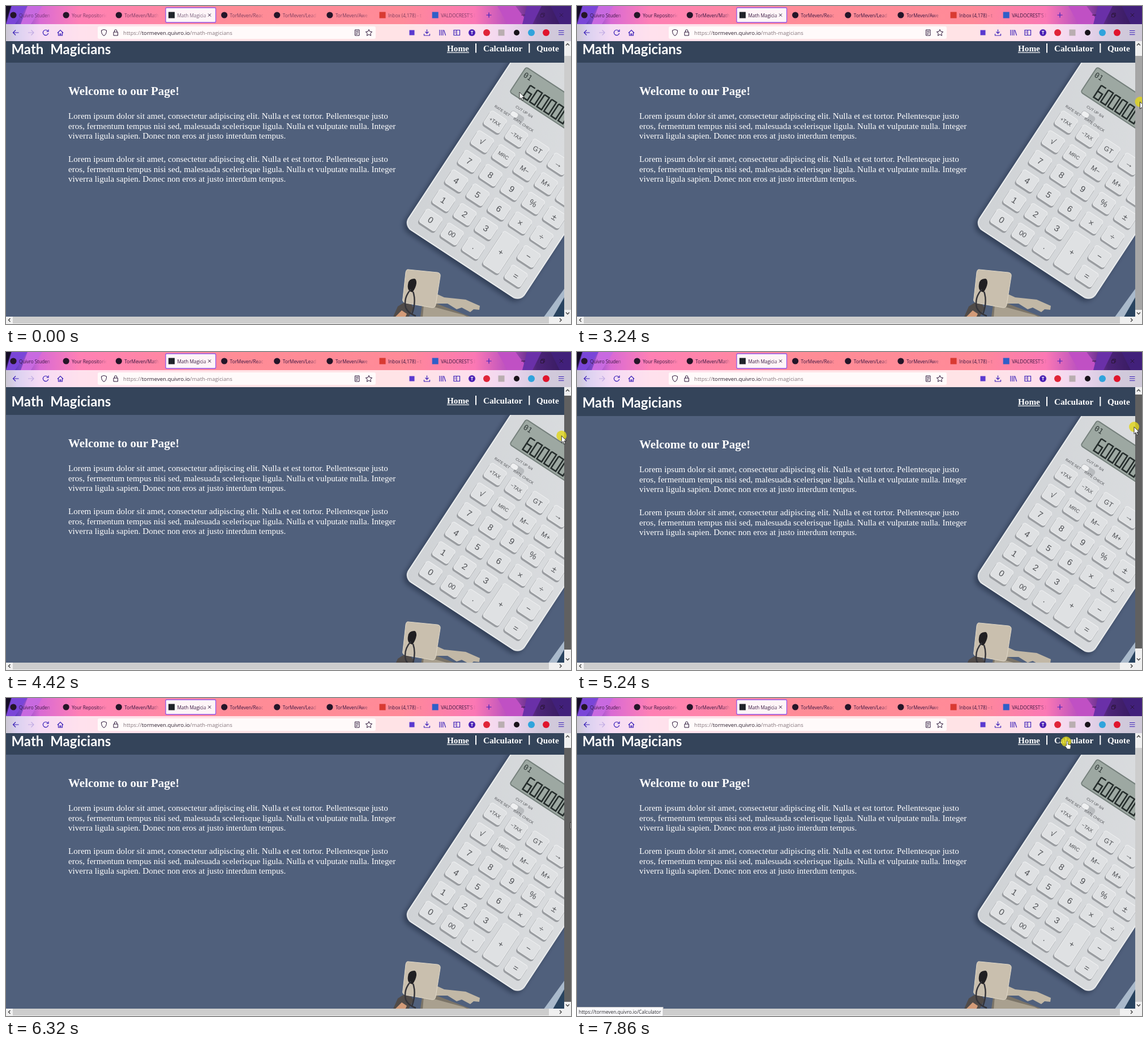
Write an HTML page that moves like this. It is 998 by 561 pixels and loops after 7.99 s.

```html
<!DOCTYPE html>
<html lang="en">
<head>
<meta charset="utf-8">
<title>Math Magicians</title>
<style>
  html, body { margin: 0; width: 100%; height: 100%; overflow: hidden; background: #f0f0f0; }
  svg { display: block; width: 998px; height: 561px; }
  .ui { font-family: "Open Sans", "Noto Sans", sans-serif; }
  .serif { font-family: "Liberation Serif", "Times New Roman", serif; fill: #fff; }
  .line { fill: none; stroke: #3b22b8; stroke-width: 1.2; }
  .dark { stroke: #2a1538; stroke-width: 1; }
  .key { font-family: "Liberation Sans", Arial, sans-serif; fill: #4c4e52; text-anchor: middle; }
</style>
</head>
<body>
<svg id="stage" viewBox="0 0 998 561" xmlns="http://www.w3.org/2000/svg"></svg>
<script>
const LOOP = 7990;
const stage = document.getElementById('stage');
const $ = id => document.getElementById(id);
const rect = (x, y, w, h, fill, extra = '') =>
  `<rect x="${x}" y="${y}" width="${w}" height="${h}" fill="${fill}" ${extra}/>`;
const dot = (x, y, r, fill) => `<circle cx="${x}" cy="${y}" r="${r}" fill="${fill}"/>`;
const poly = (pts, fill) => `<polygon points="${pts}" fill="${fill}"/>`;
const line = (d, cls = 'line') => `<path class="${cls}" d="${d}"/>`;
const text = (x, y, size, str, extra = '') =>
  `<text x="${x}" y="${y}" font-size="${size}" ${extra}>${str}</text>`;

const defs = `<defs>
  <linearGradient id="theme">
    <stop offset="0" stop-color="#2a1848"/><stop offset=".02" stop-color="#6a40c4"/>
    <stop offset=".06" stop-color="#d96ad4"/><stop offset=".13" stop-color="#ff80b4"/>
    <stop offset=".4" stop-color="#ff8c96"/><stop offset=".7" stop-color="#ff8a98"/>
    <stop offset=".83" stop-color="#fb78b4"/><stop offset=".89" stop-color="#b850c0"/>
    <stop offset=".94" stop-color="#4c2478"/><stop offset="1" stop-color="#301858"/>
  </linearGradient>
  <linearGradient id="fade" gradientUnits="userSpaceOnUse" x1="46" x2="62" y1="0" y2="0">
    <stop offset="0" stop-color="#35143f"/><stop offset="1" stop-color="#35143f" stop-opacity="0"/>
  </linearGradient>
  <linearGradient id="body" x1="0" y1="1" x2="1" y2="0">
    <stop offset="0" stop-color="#cfd2d5"/><stop offset="1" stop-color="#dfe1e3"/>
  </linearGradient>
  <clipPath id="view"><rect y="62" width="986" height="486"/></clipPath>
</defs>`;

// Browser frame
const tabs = [
  ['Quivro Studen', 'dot'], ['Your Repositorie', 'dot'], ['TorMeven/Math', 'dot'],
  ['Math Magicia', '#20232a'], ['TorMeven/Reac', 'dot'], ['TorMeven/Lead', 'dot'],
  ['TorMeven/Awe', 'dot'], ['Inbox (4,178) - t', '#d93a32'], ["VALDOCREST'S I", '#2f5fc8']
];
function tabBar() {
  let icons = '', names = '';
  tabs.forEach(([name, icon], i) => {
    const x = 13 + i * 93.15;
    icons += icon === 'dot' ? dot(x, 16, 5.6, '#241528') : rect(x - 5.5, 10.5, 11, 11, icon);
    names += `<g transform="translate(${x + 10} 0)">${text(0, 19.5, 8.2, name, 'fill="url(#fade)"')}</g>`;
  });
  return rect(0, 0, 998, 62, 'url(#theme)')
    + poly('0,0 9,0 0,26', '#140c26') + poly('10,0 38,0 16,32 0,32', '#7a46d8')
    + poly('38,0 64,0 44,32 26,32', '#c86ae0')
    + poly('868,0 900,0 924,32 886,32', '#c050c4') + poly('920,0 946,0 930,32 912,32', '#6a30a8')
    + poly('962,0 998,0 998,32 978,32', '#41207a')
    + rect(0, 32, 998, 30, '#fff', 'opacity=".76"')
    + rect(282, 3, 88.5, 26, '#fff5f8', 'rx="2" stroke="#9255e8" stroke-width="1.3"')
    + icons + `<g id="live">${names}`
    + line('M910 16h7M944.5 14.5h5v5h-5zM946 14.5v-1.8h5.2v5.2h-1.7M977.8 12.8l6.4 6.4m0-6.4l-6.4 6.4', 'line dark')
    + '</g>' + line('M357 13.5l5 5m0-5l-5 5', 'line dark') + line('M848.5 16h9M853 11.5v9');
}
function toolbar() {
  return rect(162, 36, 491, 22, '#fffafa', 'rx="3"')
    + line('M22.5 47h-10m4.5-4.5l-4.5 4.5l4.5 4.5')
    + `<g opacity=".25">${line('M39 47h10m-4.5-4.5l4.5 4.5l-4.5 4.5')}</g>`
    + line('M74 44.3a4.7 4.7 0 1 0 .7 3.7M75 41.5v3.5h-3.5')
    + line('M91 47.5l5-5l5 5M92.5 46.5v5.5h7v-5.5M95 52v-3h2v3')
    + line('M173 41.5l4.5 1.5q.3 7-4.5 9.5q-4.8-2.5-4.5-9.5z', 'line dark')
    + line('M190 46h7.5v6h-7.5zM191.5 46v-2a2.2 2.2 0 0 1 4.4 0v2', 'line dark')
    + text(207, 51, 9.6, 'https://<tspan fill="#2d2030">tormeven.quivro.io</tspan>/math-magicians', 'fill="#85757c"')
    + line('M616.5 42h7.5v10h-7.5zM618 44.5h4.5M618 47h4.5M618 49.5h3', 'line dark')
    + line('M641 41.5l1.7 3.6 4 .5-2.9 2.7.7 4-3.5-2-3.5 2 .7-4-2.9-2.7 4-.5z', 'line dark')
    + rect(712.5, 42.5, 9, 9, '#5a3ad0')
    + line('M743.5 41.5v7m-3-3l3 3l3-3M738.5 49v3h10v-3')
    + line('M766 42v10M769 42v10M771.8 42v10M773.5 42.5l3 9.5')
    + line('M791 42.5h10.5v9h-10.5zM796 42.5v9M792.5 45h2M792.5 47.5h2')
    + dot(823, 47, 6, '#4b22b4') + text(823, 50, 8, 'T', 'fill="#fff" text-anchor="middle" font-weight="700"')
    + dot(849, 47, 6, '#e02438') + rect(869.5, 41.5, 11, 11, '#b9aeb0')
    + dot(902, 47, 5, '#17121a') + dot(928, 47, 6, '#2fa4dc') + dot(954, 47, 6, '#e0142c')
    + line('M976 43.5h9.5M976 47h9.5M976 50.5h9.5');
}

// Calculator, in its own tilted axes: x along the rows, y up the columns
const keyRows = [
  ['0', '00', '·', '', '='], ['1', '2', '3', '', '−'], ['4', '5', '6', '×', '÷'],
  ['7', '8', '9', '%', '±'], ['√', 'MRC', 'M−', 'M+', 'C'], ['+TAX', '−TAX', 'GT', '→', '']
];
function button(x, y, label, h = 28) {
  const size = label.length > 2 ? 9 : label.length > 1 ? 12 : 15;
  return rect(x - 17, y - h / 2 + 2, 35, h + 2, '#9a9da1', 'rx="5"')
    + rect(x - 16, y - h / 2, 33, h, '#dfe1e3', 'rx="4" stroke="#f0f1f2"')
    + text(x, y + size * .36, size, label, 'class="key"');
}
function digit(x, six) {
  return `<path d="M${x} -329h10${six ? 'M' + x + ' -317h10v13h-10v-25' : 'v25h-10v-25'}" fill="none" stroke="#252d2c" stroke-width="2.6"/>`;
}
function calculator() {
  let s = rect(0, -440, 245, 440, 'url(#body)', 'rx="15" stroke="#eceeef" stroke-width="2" style="filter:drop-shadow(-2px 6px 4px #1b263c99)"')
    + rect(27, -352, 214, 53, '#9da8a2', 'rx="4" stroke="#75807c" stroke-width="2"')
    + text(31, -335, 13, '01', 'fill="#303938" font-family="DejaVu Sans Mono, monospace"');
  for (let i = 0; i < 7; i++) s += digit(51 + i * 15, i === 0);
  keyRows.forEach((row, r) => row.forEach((label, c) => {
    if (label) s += button(34 + c * 45, -34 - r * 41.4, label);
  }));
  return `<g transform="translate(703 387) rotate(33.3)">${s}
    ${button(169, -54.5, '+', 70)}${button(200, -276, '')}
    ${rect(48, -276, 27, 11, '#b8bbbe', 'rx="5"')}${rect(49, -275, 13, 9, '#eff0f1', 'rx="4"')}
    ${text(50, -282, 6.5, 'CUT UP 5/4', 'class="key" style="text-anchor:start"')}
    ${text(34, -262, 6.5, 'RATE SET', 'class="key"')}${text(79, -262, 6.5, 'RATE CHECK', 'class="key"')}
  </g>`;
}
function keyRing() {
  return poly('684,548 692,530 711,518 720,533 704,561 684,561', '#504b49')
    + poly('688,548 699,537 708,543 700,561 684,561', '#d39b78')
    + poly('735,528 758,524 820,548 838,561 730,561', '#7b7468')
    + poly('748,505 761,508 774,514 812,518 837,529 836,536 826,535 820,540 805,532 796,535 780,525 756,525', '#c2b8a6')
    + poly('738,526 760,532 808,545 822,552 814,561 735,561', '#a9a08f')
    + '<path d="M711 465l51 5q6 1 5 7l-8 50q-1 6-7 5l-46-8q-7-2-5-8l5-46q1-6 5-5z" fill="#c9bfae" stroke="#e0d8c8"/>'
    + '<path d="M721 481q-10 0-11 10q-2 12 8 14q6-8 7-16q0-8-4-8z" fill="#201f22"/>'
    + '<path d="M715 500q-13 14-9 32q4 10 18 15M719 504q6 17-2 40" fill="none" stroke="#34343a" stroke-width="2.5"/>'
    + poly('986,499 941,561 986,561', '#a9b9cb') + poly('986,514 959,561 986,561', '#28435f');
}

const lorem = ['Lorem ipsum dolor sit amet, consectetur adipiscing elit. Nulla et est tortor. Pellentesque justo',
  'eros, fermentum tempus nisi sed, malesuada scelerisque ligula. Nulla et vulputate nulla. Integer',
  'viverra ligula sapien. Donec non eros at justo interdum tempus.'];
const paragraph = y => lorem.map((l, i) => text(110, y + i * 17.53, 15.17, l)).join('');

// Page coordinates are those of the page scrolled to its end
function page() {
  return `<g clip-path="url(#view)"><g id="page">
    ${rect(0, 49, 986, 520, '#50607c')}${keyRing()}${calculator()}
    ${rect(0, 49, 986, 51, '#34445a')}
    ${text(9.5, 84.5, 24, 'Math Magicians', 'fill="#fff" font-weight="700" style="font-family:\'Comic Sans MS\',Lato,sans-serif;word-spacing:6px"')}
    <g class="serif">
      <g font-weight="700">
        ${text(779, 80, 15.2, 'Home')}${text(843, 80, 15.2, 'Calculator')}${text(937, 80, 15.2, 'Quote')}
        ${text(110, 156.5, 21, 'Welcome to our Page!')}
      </g>
      ${rect(779, 81.5, 39, 1.2, '#fff')}${rect(829, 66, 2, 16.5, '#fff')}${rect(923.3, 66, 2, 16.5, '#fff')}
      ${paragraph(199)}${paragraph(275)}
    </g>
  </g></g>`;
}
function scrollBars() {
  const arrows = 'M989 69.5l3-3l3 3M989 540.5l3 3l3-3M7.5 551l-3 3l3 3M978 551l3 3l-3 3';
  return rect(986, 62, 12, 499, '#f0f0f0') + rect(0, 548, 998, 13, '#f0f0f0')
    + rect(12, 548, 947, 12, '#cdcdcd')
    + '<rect id="thumb" x="986" y="88" width="12" height="448"/>'
    + `<path d="${arrows}" fill="none" stroke="#505050" stroke-width="1.6"/>`;
}

stage.innerHTML = defs + `<g class="ui">${tabBar()}${toolbar()}</g>` + page() + scrollBars()
  + `<g id="status" class="ui">${rect(-1, 545.5, 153, 16, '#f9f9fb', 'stroke="#c4c4c8"')}
     ${text(3, 556.5, 8.4, 'https://tormeven.quivro.io/Calculator', 'fill="#2a2a2e"')}</g>
  <g id="cursor"><circle id="press" r="9" fill="#e0d51c" fill-opacity=".82"/>
    <path id="arrow" d="M0 0V12.5L2.9 9.9L5 14.6L7 13.7L5 9.1H8.8Z" fill="#fff" stroke="#111" stroke-width=".8"/>
    <path id="hand" d="M.6 7V.2a1.3 1.3 0 0 1 2.6 0V5l4.2.9q1 .3.9 1.4L7.6 13H2L-1.6 8.2q-.6-1.6.8-1.5z" fill="#fff" stroke="#222" stroke-width=".7"/>
  </g>`;

// [time, x, y]
const path = [
  [0, 907, 152], [1389, 907, 152], [1390, 907, 150.5], [1900, 907, 150.5], [2080, 899, 170],
  [2280, 922, 187], [2480, 958, 184], [2680, 984, 178], [2950, 996, 172], [3170, 996, 170],
  [3240, 994.5, 169], [3600, 996, 177], [3990, 992, 170], [4280, 980, 161], [4620, 983, 129],
  [5030, 983, 129], [5240, 984, 132], [5500, 990, 158], [5780, 997, 188], [6180, 997, 219],
  [6520, 997, 219], [6800, 950, 150], [7060, 872, 84], [7260, 864, 77], [LOOP, 864, 77]
];
const thumbSteps = [[0, '#cdcdcd'], [2750, '#a6a6a6'], [3310, '#606060'], [6380, '#a6a6a6'], [6590, '#cdcdcd']];

function place(t) {
  const i = Math.max(1, path.findIndex(p => p[0] > t));
  const [t0, x0, y0] = path[i - 1], [t1, x1, y1] = path[i];
  const k = (t - t0) / (t1 - t0);
  return [x0 + (x1 - x0) * k, y0 + (y1 - y0) * k];
}
const show = (id, on) => $(id).setAttribute('visibility', on ? 'visible' : 'hidden');

function draw(t) {
  const [x, y] = place(t);
  const drag = t >= 3240 && t < 6320;
  const link = t >= 7190;
  // The page follows the held thumb within its 13 px of travel
  const up = drag ? Math.round(13 - Math.min(13, Math.max(0, y - 146))) : 0;
  $('page').setAttribute('transform', `translate(0 ${up})`);
  $('thumb').setAttribute('y', 88 - up);
  $('thumb').setAttribute('fill', thumbSteps.filter(s => s[0] <= t).pop()[1]);
  $('cursor').setAttribute('transform', `translate(${x} ${y})`);
  $('live').setAttribute('opacity', t < 70 ? .65 : 1);
  show('press', drag || t >= 7790);
  show('arrow', !link);
  show('hand', link);
  show('status', t >= 7470);
}
function tick() {
  draw(performance.now() % LOOP);
  requestAnimationFrame(tick);
}
tick();
</script>
</body>
</html>
```
